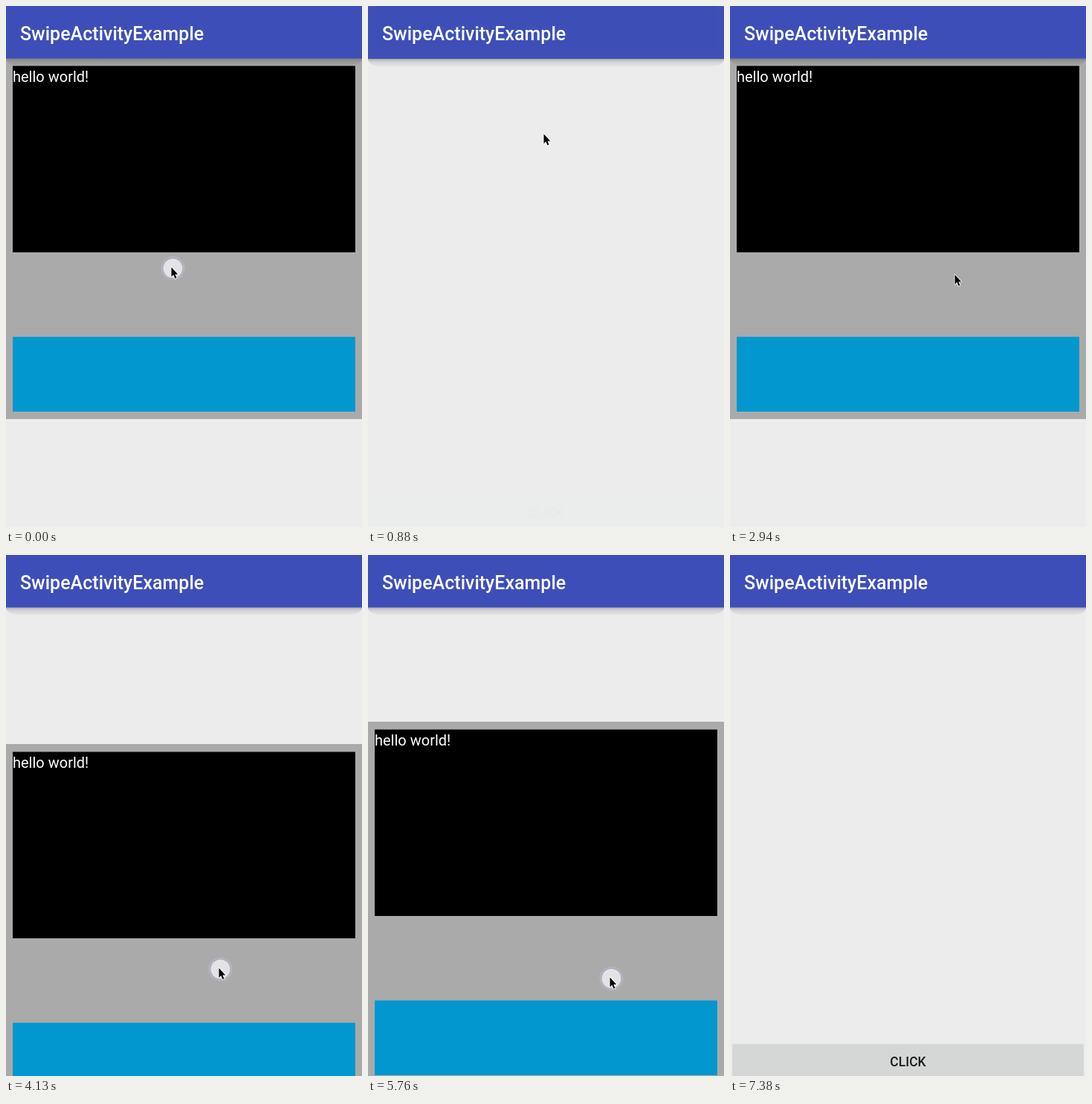
Animation, 479 px wide and 700 px high, one loop 8.69 s. Source, as an HTML page with a canvas:

```html
<!DOCTYPE html>
<html>
<head>
<meta charset="utf-8">
<style>
html, body { margin: 0; width: 100%; height: 100%; overflow: hidden; background: #ececec; }
canvas { display: block; }
</style>
</head>
<body>
<canvas id="stage" width="479" height="700"></canvas>
<script>
const W = 479, H = 700, LOOP = 8690, TICKS = 59;
const TAP = 15, OPEN = 16, SLOP = 10, SETTLE = 2;
const ctx = document.getElementById('stage').getContext('2d');

// All times are in ticks
const pointerStart = { x: 222, y: 350 };
const glides = [
  { from: 0, to: 4, x: 236, y: 171 },
  { from: 6, to: 8, x: 239, y: 194 },
  { from: 8, to: 11, x: 229, y: 670 },
  { from: 16, to: 20, x: 302, y: 360 },
  { from: 24, to: 28, x: 286, y: 554 },
  { from: 32, to: 34, x: 310, y: 403 },
  { from: 37, to: 41, x: 340, y: 730 },
  { from: 44, to: 47, x: 363, y: 687 },
  { from: 49, to: 50, x: 370, y: 730 }
];
const swipes = [
  { down: 0, up: 3, rest: -490 },
  { down: 22, up: 28, rest: 0 },
  { down: 36, up: 39, rest: 640 }
];

const mix = (a, b, p) => a + (b - a) * p;
const ramp = (t, from, to) => Math.min(1, Math.max(0, (t - from) / (to - from)));
const smooth = p => p * p * (3 - 2 * p);
const easeOut = p => 1 - (1 - p) ** 2;

function pointerAt(tick) {
  return glides.reduce((pos, glide) => {
    const p = smooth(ramp(tick, glide.from, glide.to));
    return { x: mix(pos.x, glide.x, p), y: mix(pos.y, glide.y, p) };
  }, pointerStart);
}

// The panel follows the finger past a small slop, then settles after release
function panelOffset(tick) {
  const { down, up, rest } = swipes.findLast(swipe => swipe.down <= tick);
  if (down < OPEN && tick >= OPEN) return 0;
  const drag = pointerAt(Math.min(tick, up)).y - pointerAt(down).y;
  const held = Math.sign(drag) * Math.max(0, Math.abs(drag) - SLOP);
  return mix(held, rest, easeOut(ramp(tick, up, up + SETTLE)));
}

// 0 while the swipe screen covers the stage, 1 when it has closed
function screenAway(tick) {
  return ramp(tick, 5.8, 7.8) - easeOut(ramp(tick, OPEN, OPEN + 3)) + ramp(tick, 42.8, 44.8);
}

function rect(color, x, y, w, h) {
  ctx.fillStyle = color;
  ctx.fillRect(x, y, w, h);
}

function rounded(color, x, y, w, h, radii) {
  ctx.fillStyle = color;
  ctx.beginPath();
  ctx.roundRect(x, y, w, h, radii);
  ctx.fill();
}

function disc(x, y, r, color) {
  ctx.fillStyle = color;
  ctx.beginPath();
  ctx.arc(x, y, r, 0, Math.PI * 2);
  ctx.fill();
}

function text(label, x, y, size, weight, color, align = 'left') {
  ctx.font = `${weight} ${size}px Roboto, sans-serif`;
  ctx.textAlign = align;
  ctx.fillStyle = color;
  ctx.fillText(label, x, y);
}

function drawToolbar() {
  const shade = ctx.createLinearGradient(0, 70, 0, 81);
  shade.addColorStop(0, 'rgba(0,0,0,0.26)');
  shade.addColorStop(0.4, 'rgba(0,0,0,0.11)');
  shade.addColorStop(1, 'rgba(0,0,0,0.02)');
  const corner = { x: 20, y: 10 };
  rounded(shade, 0, 70, W, 11, [0, 0, corner, corner]);
  rect('#3e4eb8', 0, 0, W, 70.5);
  text('SwipeActivityExample', 19, 45.5, 25, 500, '#fff');
}

function drawMain(pressed) {
  rect('#ececec', 0, 0, W, H);
  rounded(pressed ? '#c6c8c7' : '#d5d7d6', 3, 657, 473, 60, 3);
  text('CLICK', W / 2, 687, 17.5, 500, '#1c1c1c', 'center');
  drawToolbar();
}

function drawSwipeScreen(panelY, away) {
  const dy = 60 * away ** 2;
  ctx.save();
  ctx.globalAlpha = 1 - away ** 2;
  ctx.translate(0, dy);
  rect('#ececec', 0, 0, W, H);
  ctx.save();
  ctx.translate(0, Math.round(panelY));
  rect('#aaaaaa', 0, 70, W, 485);
  rect('#000', 9, 80.5, 461, 250.5);
  rect('#0298cf', 9, 444.5, 461, 100.5);
  text('hello world!', 9, 101.5, 20, 400, '#fff');
  ctx.restore();
  drawToolbar();
  rect('#303f9f', 0, -dy, W, dy);
  ctx.restore();
}

function drawPointer({ x, y }, pressed) {
  if (pressed) {
    disc(x + 2.5, y + 2.5, 16, 'rgba(190,190,198,0.6)');
    disc(x + 2.5, y + 2.5, 14, '#a4a4c6');
    disc(x + 2.5, y + 2.5, 13, '#e3e3e5');
  }
  const arrow = new Path2D('M0 0V14L3.2 11L5.6 16.4L8 15.4L5.6 10.2H10Z');
  ctx.save();
  ctx.translate(x + 0.5, y + 1);
  ctx.scale(0.88, 0.92);
  ctx.lineJoin = 'round';
  ctx.lineWidth = 1.8;
  ctx.strokeStyle = '#fff';
  ctx.stroke(arrow);
  ctx.fillStyle = '#000';
  ctx.fill(arrow);
  ctx.restore();
}

function render(ms) {
  const tick = Math.min(TICKS - 1, Math.floor((ms % LOOP + 16) * TICKS / LOOP));
  const swiping = swipes.some(({ down, up }) => tick >= down && tick <= up);
  const away = screenAway(tick);
  drawMain(tick === TAP || tick === OPEN);
  if (away < 1) drawSwipeScreen(panelOffset(tick), away);
  drawPointer(pointerAt(tick), swiping || tick === TAP);
}

const start = performance.now();
function loop() {
  render(performance.now() - start);
  requestAnimationFrame(loop);
}
loop();
</script>
</body>
</html>
```
